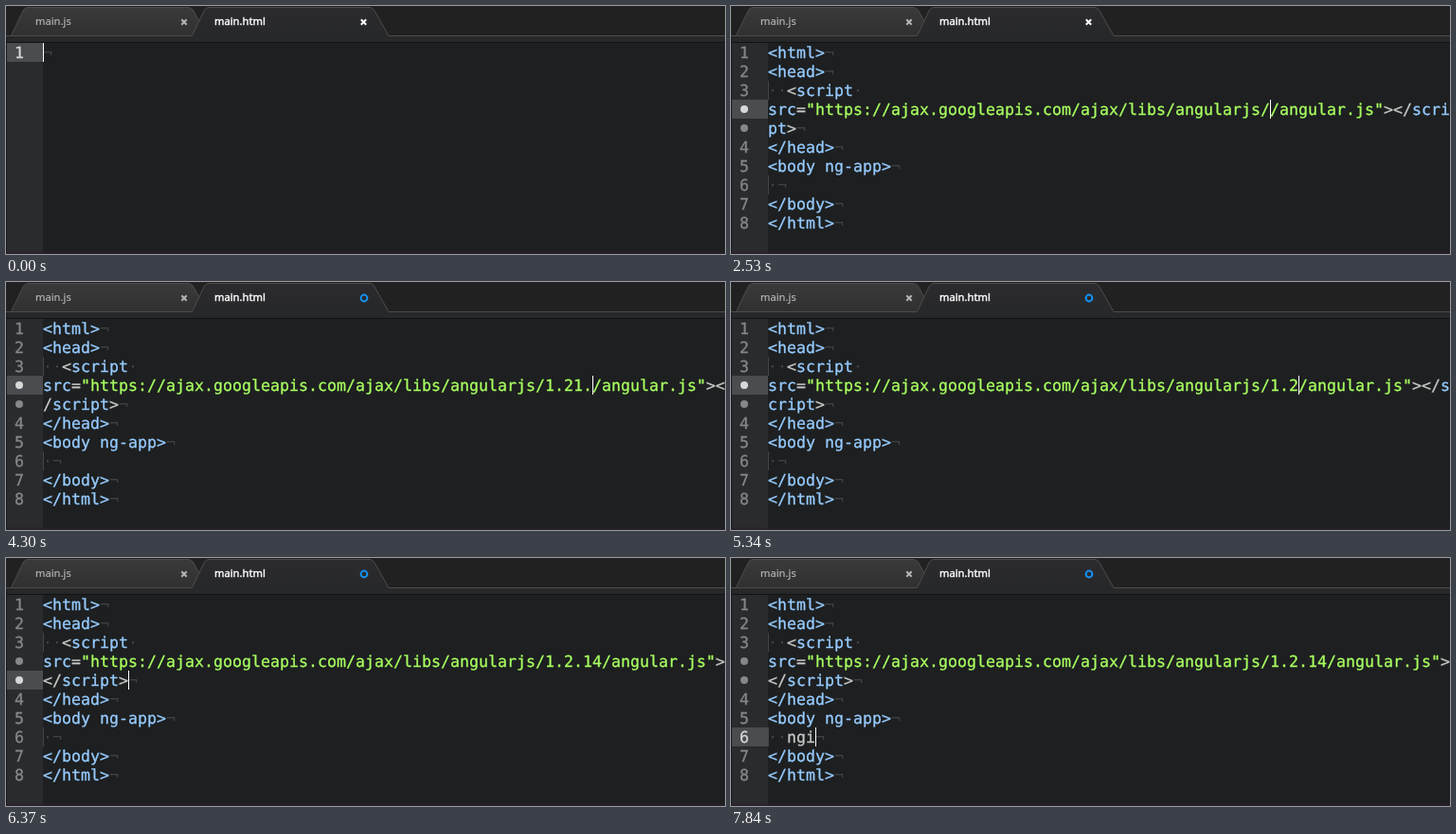
Animation, 759 px wide and 262 px high, one loop 7.99 s. Source, as an HTML page:

```html
<!DOCTYPE html>
<html lang="en">
<head>
<meta charset="utf-8">
<title>Editor</title>
<style>
html, body { margin: 0; width: 100%; height: 100%; overflow: hidden; background: #1d1f20; }
#stage { position: relative; width: 759px; height: 262px; overflow: hidden; }
svg { position: absolute; left: 0; top: 0; font: 11.2px "Noto Sans", sans-serif; }
#gutter { position: absolute; left: 1px; top: 39px; width: 38px; height: 223px; background: #2a2b2e; }
#code { position: absolute; left: 0; top: 39px; color: #c5c8c6; text-rendering: geometricPrecision;
  font: 16.61px/22px "DejaVu Sans Mono", monospace; font-variant-ligatures: none; -webkit-text-stroke: .3px; }
.row { position: relative; height: 20px; padding-left: 39px; white-space: pre; }
.num { position: absolute; left: 1px; width: 30px; height: 20px; padding-left: 8px; color: #85888b; }
.active .num { background: #4b4c4f; color: #d6d8d8; }
.dot { position: absolute; left: 9px; top: 6px; width: 8px; height: 8px; border-radius: 50%; background: currentColor; }
.guide::after { content: ""; position: absolute; left: 39px; top: 0; width: 1px; height: 20px; background: #434547; }
.tag { color: #96cbfe; }
.str { color: #a8ff60; }
.dim { color: #3f4143; -webkit-text-stroke: 0; }
#caret { position: absolute; width: 1px; height: 20px; background: #fff; }
#edge { position: absolute; left: 0; bottom: 0; width: 759px; height: 4px; background: linear-gradient(#2a1f2c00, #2a1f2c); }
</style>
</head>
<body>
<div id="stage">
  <svg width="759" height="262">
    <defs>
      <linearGradient id="back" x2="0" y2="1"><stop stop-color="#3a3a3b"/><stop offset="1" stop-color="#303031"/></linearGradient>
      <linearGradient id="front" x2="0" y2="1"><stop stop-color="#2b2b2f"/><stop offset="1" stop-color="#272829"/></linearGradient>
    </defs>
    <rect width="759" height="39" fill="#212122"/>
    <rect y="32" width="759" height="6" fill="#272829"/>
    <path d="M5.500 31.500L18 5Q20 1.500 23 1.500H192Q196 1.500 198 5L212 31.500" fill="url(#back)" stroke="#4c4c4d"/>
    <path d="M196.500 32L209 5Q211 1.500 214 1.500H384Q387 1.500 389 5L404 32Z" fill="url(#front)"/>
    <path d="M0 31.500H196.500L209 5Q211 1.500 214 1.500H384Q387 1.500 389 5L404 31.500H759" fill="none" stroke="#4c4c4d"/>
    <path d="M0 38.500H759" stroke="#111213"/>
    <path d="M.5 32V262" stroke="#151617"/>
    <text x="31" y="20" fill="#b8b8b8" stroke="#b8b8b8" stroke-width=".15">main.js</text>
    <text x="220" y="20" fill="#fff" stroke="#fff" stroke-width=".4">main.html</text>
    <path d="M185.300 14.300l5.400 5.400m0-5.400l-5.400 5.400" stroke="#b5b5b5" stroke-width="2"/>
    <path id="close" d="M374.800 14.300l5.400 5.400m0-5.400l-5.400 5.400" stroke="#fff" stroke-width="2"/>
    <circle id="dirty" cx="378" cy="17" r="3.400" fill="none" stroke="#1491f2" stroke-width="2"/>
  </svg>
  <div id="gutter"></div>
  <div id="code"></div>
  <div id="caret"></div>
  <div id="edge"></div>
</div>
<script>
const LOOP = 7990, KEY = 145, COLS = 72, VERSION_COL = 53;
const $ = id => document.getElementById(id);

// Each step changes part of the editor state at a given time.
const steps = [];
const at = (time, change) => steps.push([time, change]);
const blink = (time, on) => at(time, { on });
const type = (time, key, values, place) =>
  values.forEach((value, i) => at(time + i * KEY, { [key]: value, on: true, ...place(value) }));
const grow = word => [...word].map((_, i) => word.slice(0, i + 1));
const inVersion = v => ({ col: VERSION_COL + v.length, row: 3 });
const inBody = v => ({ col: v.length, row: 7 });

at(0, { word: "", page: false, version: "", body: " ", col: 0, row: 0, on: true, dirty: false });
blink(150, false);
blink(600, true);
blink(1050, false);
type(1350, "word", grow("ngindex"), v => ({ col: v.length }));
blink(2380, false);
at(2530, { page: true, on: true, ...inVersion("") });
at(2820, { dirty: true });
blink(2970, false);
blink(3420, true);
type(3720, "version", grow("1.21."), inVersion);
blink(3720, false);
blink(4600, false);
blink(4890, true);
type(5190, "version", ["1.21", "1.2"], inVersion);
blink(5480, false);
type(5630, "version", ["1.2.", "1.2.1", "1.2.14"], inVersion);
blink(6070, false);
[[9, 4], [7, 5], [13, 6], [1, 7]].forEach(([col, row], i) => at(6370 + i * KEY, { col, row, on: true }));
blink(6960, false);
blink(7250, true);
type(7395, "body", ["  ", "  n", "  ng", "  ngi"], inBody);
steps.sort((a, b) => a[0] - b[0]);

const escape = s => s.replace(/</g, "&lt;");
const span = (kind, s) => `<span class="${kind}">${escape(s)}</span>`;
const dots = s => span("dim", "·".repeat(s.length));
const EOL = span("dim", "¬");

// Renders coloured runs between two columns.
function cut(runs, from, to) {
  let pos = 0;
  return runs.map(([kind, s]) => {
    const part = s.slice(Math.max(0, from - pos), Math.max(0, to - pos));
    pos += s.length;
    return span(kind, part);
  }).join("");
}

function rows(s) {
  if (!s.page) return [["1", s.word + EOL]];
  const script = [
    ["tag", "src"], ["", "="],
    ["str", `"https://ajax.googleapis.com/ajax/libs/angularjs/${s.version}/angular.js"`],
    ["", "></"], ["tag", "script"], ["", ">"]
  ];
  const tag = text => span("tag", text) + EOL;
  return [
    ["1", tag("<html>")],
    ["2", tag("<head>")],
    ["3", dots("  ") + span("", "<") + span("tag", "script") + dots(" "), "guide"],
    ["", cut(script, 0, COLS)],
    ["", cut(script, COLS, 999) + EOL],
    ["4", tag("</head>")],
    ["5", tag("<body ng-app>")],
    ["6", s.body.replace(/^ +/, dots) + EOL, "guide"],
    ["7", tag("</body>")],
    ["8", tag("</html>")]
  ];
}

function draw(s) {
  $("code").innerHTML = rows(s).map(([num, text, kind = ""], i) =>
    `<div class="row ${kind} ${i === s.row ? "active" : ""}">` +
    `<span class="num">${num || '<i class="dot"></i>'}</span>${text}</div>`).join("");
  $("caret").style.cssText = `left:${39 + s.col * 10}px;top:${39 + s.row * 20}px;opacity:${+s.on}`;
  $("close").style.opacity = +!s.dirty;
  $("dirty").style.opacity = +s.dirty;
}

let shown = -1;
function frame() {
  const time = performance.now() % LOOP;
  const past = steps.filter(step => step[0] <= time);
  if (past.length !== shown) {
    shown = past.length;
    draw(Object.assign({}, ...past.map(step => step[1])));
  }
  requestAnimationFrame(frame);
}
frame();
</script>
</body>
</html>
```
